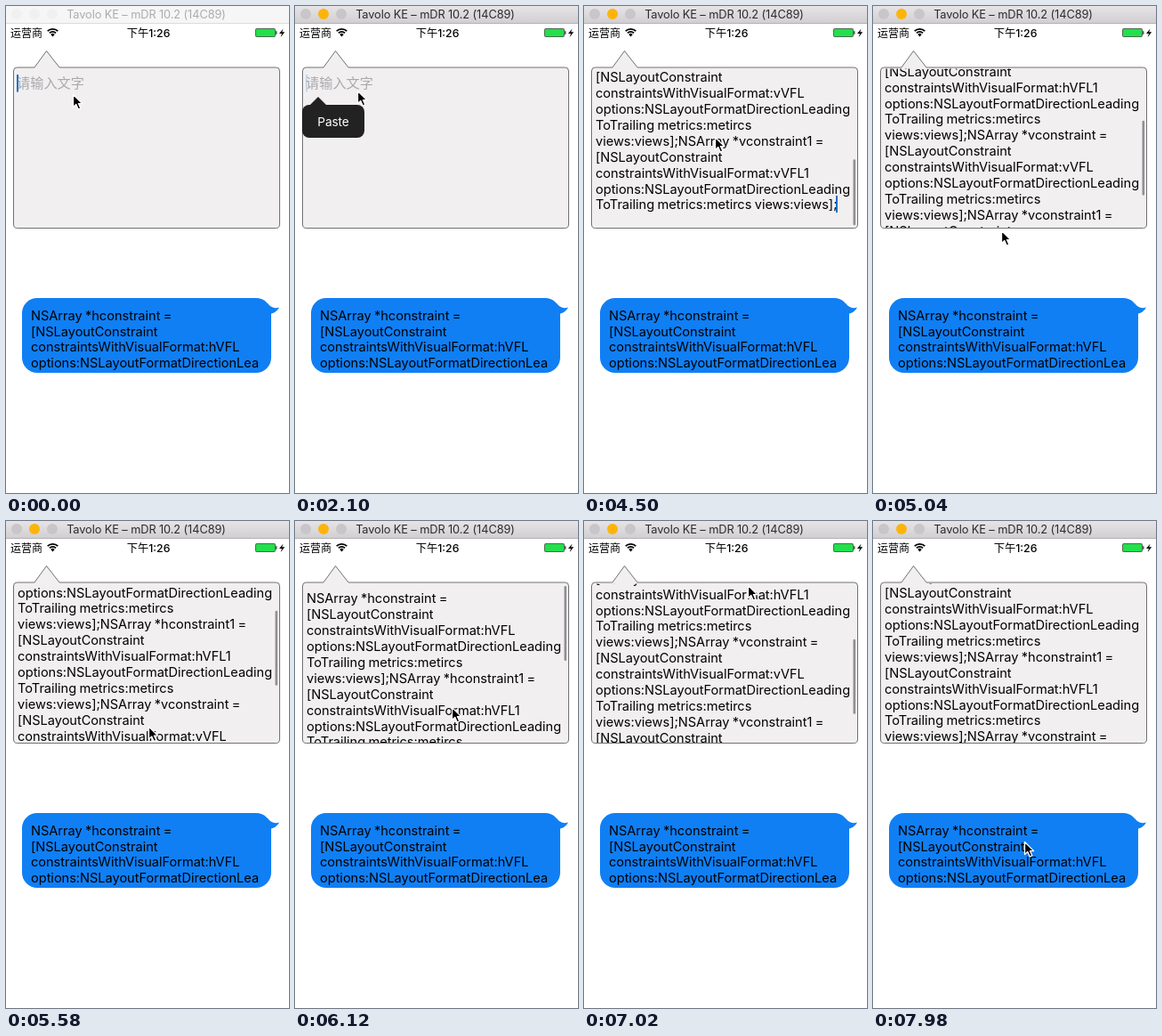
Write an HTML page with a canvas that moves like this. It is 318 by 547 pixels and loops after 8000 ms.

```html
<!DOCTYPE html>
<html lang="zh">
<head>
<meta charset="utf-8">
<style>
html, body { margin: 0; width: 318px; height: 547px; overflow: hidden; background: #fff; }
canvas { display: block; }
</style>
</head>
<body>
<canvas width="318" height="547"></canvas>
<script>
const ctx = document.querySelector('canvas').getContext('2d');
const LOOP = 8000, STEP = 60, LINE = 17.9, MAX_SCROLL = 194;
const SANS = 'Inter, Roboto, sans-serif';
const CJK = '"Noto Sans CJK SC", "Noto Sans CJK", sans-serif';

// Each statement's last line also starts the next statement
const names = ['hconstraint', 'hconstraint1', 'vconstraint', 'vconstraint1'];
const code = [`NSArray *${names[0]} =`];
names.forEach((name, i) => {
  code.push(
    '[NSLayoutConstraint',
    'constraintsWithVisualFormat:' + name.replace('constraint', 'VFL'),
    'options:NSLayoutFormatDirectionLeading');
  if (i < 3) code.push('ToTrailing metrics:metircs', `views:views];NSArray *${names[i + 1]} =`);
  else code.push('ToTrailing metrics:metircs views:views];');
});
const bubble = [...code.slice(0, 3), code[3].replace('ding', '')];

// Pointer position and scroll offset at the turns of the gesture
const poses = [
  { at: 0, x: 75, y: 99, scroll: 194 },
  { at: 2100, x: 70, y: 95, scroll: 194 },
  { at: 2760, x: 46, y: 128, scroll: 194 },
  { at: 3700, x: 146, y: 230, scroll: 120 },
  { at: 4500, x: 147, y: 147, scroll: 204 },
  { at: 5040, x: 144, y: 252, scroll: 121 },
  { at: 6120, x: 176, y: 209, scroll: 0 },
  { at: 7020, x: 184, y: 72, scroll: 130 },
  { at: 7440, x: 180, y: 178, scroll: 24 },
  { at: 7980, x: 170, y: 360, scroll: 24 }
];

const ramp = (t, from, to) => Math.max(0, Math.min(1, (t - from) / (to - from)));
const ease = p => p * p * (3 - 2 * p);

function poseAt(t) {
  const i = Math.max(1, poses.findIndex(p => p.at >= t));
  const a = poses[i - 1], b = poses[i], p = ease(ramp(t, a.at, b.at));
  const mix = key => a[key] + (b[key] - a[key]) * p;
  return { x: mix('x'), y: mix('y'), scroll: mix('scroll') };
}

function text(s, x, y, font, color, align = 'left', spacing = 0) {
  ctx.font = font;
  ctx.fillStyle = color;
  ctx.textAlign = align;
  ctx.letterSpacing = spacing + 'px';
  ctx.fillText(s, x, y);
}

function shape(d, fill, stroke, width = 1) {
  const path = new Path2D(d);
  ctx.lineWidth = width;
  ctx.fillStyle = fill;
  ctx.fill(path);
  if (stroke) {
    ctx.strokeStyle = stroke;
    ctx.stroke(path);
  }
}

function round(x, y, w, h, r, color) {
  ctx.beginPath();
  ctx.roundRect(x, y, w, h, r);
  ctx.fillStyle = color;
  ctx.fill();
}

function lines(list, x, y) {
  ctx.wordSpacing = '-0.7px';
  list.forEach((s, i) => text(s, x, y + i * LINE, '14.6px ' + SANS, '#000', 'left', -0.03));
  ctx.wordSpacing = '0px';
}

function titleBar(active) {
  const g = ctx.createLinearGradient(0, 0, 0, 20);
  g.addColorStop(0, active ? '#e6e4e6' : '#f6f6f6');
  g.addColorStop(1, active ? '#d0ced0' : '#f6f6f6');
  ctx.fillStyle = g;
  ctx.fillRect(0, 0, 318, 20);
  ctx.fillStyle = active ? '#b4b2b4' : '#dcdcdc';
  ctx.fillRect(0, 19, 318, 1);
  for (let i = 0; i < 3; i++) {
    round(6 + 20 * i, 3, 12, 12, 6, !active ? '#f0f0f0' : i === 1 ? '#fdb40a' : '#c8c6c8');
  }
  text('Tavolo KE – mDR 10.2 (14C89)', 157.5, 14, '12.8px ' + SANS, active ? '#2c2a2c' : '#acacac', 'center', -0.1);
}

function statusBar() {
  text('运营商', 5, 34.5, '12px ' + CJK, '#000');
  text('下午1:26', 160, 34.5, '500 12.3px Inter, ' + CJK, '#000', 'center');
  ctx.strokeStyle = '#000';
  ctx.lineWidth = 1.8;
  for (const r of [8.2, 5]) {
    ctx.beginPath();
    ctx.arc(52.5, 34, r, -Math.PI * 0.75, -Math.PI * 0.25);
    ctx.stroke();
  }
  shape('M52.5 34.5L50.3 32A3 3 0 0 1 54.7 32Z', '#000');
  round(280, 25, 23, 10, 2, '#4c6a52');
  round(281, 26, 21, 8, 1, '#22e04b');
  round(303, 28, 1.5, 4, 1, '#555');
  shape('M311.5 25.5L307 31H310L308.6 35L313.2 29.2H310.2Z', '#000');
}

function textView(t, scroll) {
  shape('M12.5 69H32L45.5 50.5L60 69H303.5Q307.5 69 307.5 73V245Q307.5 249.5 303.5 249.5H12.5Q8.5 249.5 8.5 245V73Q8.5 69 12.5 69Z',
    '#f1eff0', '#727072');
  const pasted = t >= 2940;
  ctx.save();
  ctx.beginPath();
  ctx.rect(9, 70.5, 298, 178.5);
  ctx.clip();
  if (pasted) lines(code, 13, 92.3 - scroll);
  else text('请输入文字', 12, 92.2, '300 15.2px ' + CJK, '#a9a8ab');

  ctx.globalAlpha = ramp(Math.cos(t / 900 * 2 * Math.PI), -0.8, 0.8);
  ctx.fillStyle = '#1a70c8';
  if (pasted) ctx.fillRect(283, 417 - scroll, 2, 19);
  else ctx.fillRect(12, 77, 2, 19.5);

  // Scroll indicator shrinks while the content is pulled past its end
  ctx.globalAlpha = ramp(t, 3000, 3120) * (1 - ramp(t, 7680, 7900));
  const over = Math.max(0, scroll - MAX_SCROLL);
  round(302.5, 73 + (scroll - over) * 0.46 + over, 2.6, 84 - over, 1.3, '#918f91');
  ctx.restore();
}

function pasteMenu(t) {
  ctx.globalAlpha = ramp(t, 1740, 1920) * (1 - ramp(t, 2880, 3060));
  shape('M16.5 111.5L26 102L35.5 111.5Z', '#222');
  round(8, 111, 70, 37, 8, '#222');
  text('Paste', 43, 135, '13.7px ' + SANS, '#fff', 'center', -0.1);
  ctx.globalAlpha = 1;
}

function message() {
  shape('M294 334Q299 341 307 338.5Q304 345 295 346Z', '#107ff4');
  round(18, 328, 280, 84, 17, '#107ff4');
  lines(bubble, 28, 352.6);
}

function pointer(x, y) {
  ctx.save();
  ctx.translate(x, y);
  ctx.lineJoin = 'round';
  shape('M.5 .5V14.5L3.8 11.5L6.2 17L8.8 15.8L6.4 10.6H10.6Z', '#000', '#fff', 1.3);
  ctx.restore();
}

function draw(now) {
  const t = Math.floor(now % LOOP / STEP) * STEP;
  const { x, y, scroll } = poseAt(t);
  ctx.fillStyle = '#fff';
  ctx.fillRect(0, 0, 318, 547);
  titleBar(t >= 1260);
  statusBar();
  textView(t, scroll);
  pasteMenu(t);
  message();
  pointer(x, y);
  requestAnimationFrame(draw);
}
requestAnimationFrame(draw);
</script>
</body>
</html>
```
